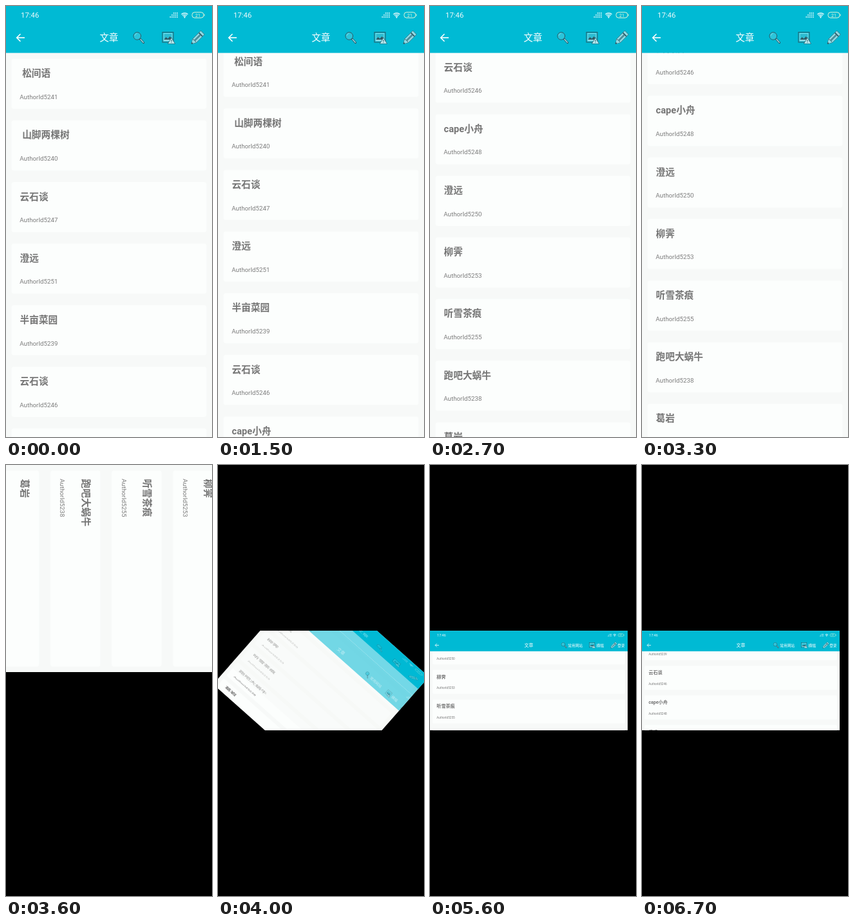
Write an HTML page with a canvas that moves like this. It is 320 by 666 pixels and loops after 6800 ms.

```html
<!DOCTYPE html>
<html lang="zh-CN">
<head>
<meta charset="utf-8">
<title>文章</title>
<style>
html, body { margin: 0; width: 100%; height: 100%; overflow: hidden; background: #000; }
canvas { display: block; width: 320px; height: 666px; }
</style>
</head>
<body>
<canvas id="stage"></canvas>
<script>
const W = 320, H = 666, LOOP = 6800, STEP = 100;
const K = W / H;              // size of the landscape screen on the stage
const BAND = W * K;           // height of the landscape screen on the stage
const LAND_W = 639;
const PITCH = 95.2;
const CYAN = '#00bad4', PAGE = '#f7f9f8', CARD = '#fcfefd';
const INK = '#2f5a66', PALE = '#8fdbe5';
const FONT = 'Roboto, "Noto Sans CJK SC", "Noto Sans CJK", sans-serif';

const items = [
  [' 松间语', 5241], [' 山脚两棵树', 5240], ['云石谈', 5247], ['澄远', 5251],
  ['半亩菜园', 5239], ['云石谈', 5246], ['cape小舟', 5248], ['澄远', 5250],
  ['柳霁', 5253], ['听雪茶痕', 5255], ['跑吧大蜗牛', 5238], ['葛岩', 5252]
];

const canvas = document.getElementById('stage');
const g = canvas.getContext('2d');
const dpr = Math.max(1, window.devicePixelRatio || 1);
canvas.width = W * dpr;
canvas.height = H * dpr;

const mix = (a, b, p) => a + (b - a) * p;
const part = (t, a, b) => Math.min(1, Math.max(0, (t - a) / (b - a)));
const smooth = p => p * p * (3 - 2 * p);
const easeOut = p => 1 - (1 - p) * (1 - p);

function rect(x, y, w, h, color) {
  g.fillStyle = color;
  g.fillRect(x, y, w, h);
}

function pill(x, y, w, h, r) {
  g.beginPath();
  g.roundRect(x, y, w, h, r);
}

function text(str, x, y, size, color, weight = 400, align = 'left') {
  g.font = `${weight} ${size}px ${FONT}`;
  g.textAlign = align;
  g.fillStyle = color;
  g.fillText(str, x, y);
}

function line(points, color, width, close) {
  g.beginPath();
  points.forEach(([x, y]) => g.lineTo(x, y));
  if (close) g.closePath();
  g.strokeStyle = color;
  g.lineWidth = width;
  g.stroke();
}

function at(x, y, draw) {
  g.save();
  g.translate(x, y);
  draw();
  g.restore();
}

function list(top, width, height, scroll) {
  g.save();
  g.beginPath();
  g.rect(0, top, width, height - top);
  g.clip();
  items.forEach(([title, id], i) => {
    const y = top + 9 + i * PITCH - scroll;
    if (y > height || y < top - 80) return;
    pill(8.5, y, width - 17, 77.5, 4);
    g.fillStyle = CARD;
    g.fill();
    text(title, 21.5, y + 27.6, 14.7, '#757575', 700);
    text('AuthorId' + id, 21.3, y + 62.2, 9.75, '#7c7c7c');
  });
  g.restore();
}

function signal() {
  for (let c = 0; c < 5; c++) {
    for (let r = 0; r < 3; r++) {
      if (r + c > 1) rect(-6.5 + c * 2.7, -4 + r * 3, 1.6, 2, 'rgba(255,255,255,.75)');
    }
  }
}

function wifi() {
  g.strokeStyle = '#fff';
  g.lineWidth = 1.2;
  for (const r of [2.8, 5, 7.2]) {
    g.beginPath();
    g.arc(0, 4, r, -Math.PI * 0.75, -Math.PI * 0.25);
    g.stroke();
  }
  g.beginPath();
  g.arc(0, 3.6, 1.1, 0, 7);
  g.fillStyle = '#fff';
  g.fill();
}

function battery() {
  pill(-9, -4.3, 18, 8.6, 4);
  g.strokeStyle = '#e4f6d8';
  g.lineWidth = 1;
  g.stroke();
  rect(9.6, -1.5, 1, 3, '#e4f6d8');
  text('21', 0, 2.5, 7, '#e9f7e0', 400, 'center');
}

function arrow() {
  line([[6.5, 0], [-5.5, 0]], '#fff', 1.6);
  line([[0, -5.8], [-5.8, 0], [0, 5.8]], '#fff', 1.6);
}

function magnifier() {
  g.lineCap = 'round';
  line([[2, 1.5], [7.5, 7.5]], INK, 3.2);
  line([[3, 2.5], [7.3, 7.3]], PALE, 1.5);
  g.beginPath();
  g.arc(-2.2, -2.6, 5.8, 0, 7);
  g.fillStyle = '#2bc5da';
  g.fill();
  g.strokeStyle = INK;
  g.lineWidth = 1;
  g.stroke();
  g.beginPath();
  g.arc(-2.2, -2.6, 4, 3.3, 4.6);
  g.strokeStyle = PALE;
  g.lineWidth = 0.8;
  g.stroke();
}

function picture() {
  g.strokeStyle = INK;
  g.lineWidth = 1;
  g.strokeRect(-8.5, -8.5, 17, 15.5);
  rect(-7, -7, 14, 12.5, PALE);
  rect(-6, -6, 12, 9, '#2bbdd2');
  g.beginPath();
  [[-6, 3], [-3, -1], [0, 1.5], [3, -2], [6, 1], [6, 3]].forEach(([x, y]) => g.lineTo(x, y));
  g.fillStyle = INK;
  g.fill();
  const sign = [[5.5, 0.5], [10.5, 9], [0.5, 9]];
  line(sign, INK, 1.2, true);
  g.fillStyle = '#b5e8ee';
  g.fill();
  rect(5, 3.2, 1, 2.8, INK);
  rect(5, 7, 1, 1, INK);
}

function pencil() {
  g.rotate(-Math.PI / 4);
  g.lineJoin = 'round';
  line([[-13, 0], [-7, -3.8], [11, -3.8], [11, 3.8], [-7, 3.8]], INK, 1, true);
  g.fillStyle = PALE;
  g.fill();
  rect(-6, -1.3, 12, 2.6, '#4e8b98');
  line([[-7, -3.8], [-6, 0], [-7, 3.8]], INK, 0.8);
  rect(6, -3.8, 1.8, 7.6, INK);
  line([[-13, 0], [-11, 0]], INK, 2);
}

// bar: positions of the header parts
const tall = { w: W, h: H, top: 72.5, row: 49, status: [261, 277.5, 298], icons: [206, 251.5, 297.5], labels: [] };
const wide = {
  w: LAND_W, h: W, top: 66, row: 46.6, status: [581, 597, 617], icons: [433, 524, 594],
  labels: [['常用网站', 446], ['横幅', 538], ['登录', 606]]
};

function screen(bar, scroll, clockX, empty) {
  rect(0, 0, bar.w, bar.h, PAGE);
  if (!empty) list(bar.top, bar.w, bar.h, scroll);
  rect(0, 0, bar.w, bar.top, CYAN);
  text('17:46', clockX, 18.4, 11.4, '#eefafb');
  [signal, wifi, battery].forEach((draw, i) => at(bar.status[i], 14, draw));
  at(22.5, bar.row, arrow);
  text('文章', bar.w / 2, bar.row + 5.4, 14.4, '#fff', 400, 'center');
  [magnifier, picture, pencil].forEach((draw, i) => at(bar.icons[i], bar.row, draw));
  bar.labels.forEach(([name, x]) => text(name, x, bar.row + 4.4, 11.8, '#fff'));
}

function tallScroll(t) {
  if (t < 2100) return 241 * part(t, 1450, 2100);
  if (t < 2700) return mix(241, 485.5, part(t, 2100, 2700));
  return mix(485.5, 514, easeOut(part(t, 2700, 2950)));
}

function wideScroll(t) {
  if (t <= 5600) return mix(514, 711, smooth(part(t, 4920, 5600)));
  return mix(711, 438, easeOut(part(t, 5620, 6750)));
}

function bandTop() {
  g.translate(0, (H - BAND) / 2);
  g.scale(K, K);
}

function turning(t) {
  const p = smooth(part(t, 3700, 4270));
  g.beginPath();
  g.rect(0, (H - BAND) / 2, W, BAND);
  g.clip();
  g.translate(W / 2, H / 2);
  g.rotate((1 - p) * Math.PI / 2);

  const sx = mix(K, 1, p), sy = mix(K, BAND / H, p);
  g.save();
  g.scale(sx, sy);
  g.translate(-W / 2, -H / 2);
  screen(tall, 514, 24);
  g.restore();

  // the new screen fades in inside the old one
  g.beginPath();
  g.rect(-W / 2 * sx, -H / 2 * sy, W * sx, H * sy);
  g.clip();
  g.globalAlpha = p;
  g.translate(-W / 2, -BAND / 2);
  g.scale(K, K);
  rect(0, -200, H, 200, CYAN);
  screen(wide, 514, 23, true);
}

function draw(t) {
  g.setTransform(dpr, 0, 0, dpr, 0, 0);
  rect(0, 0, W, H, '#000');
  g.save();
  if (t < 3500) {
    screen(tall, tallScroll(t), t < 1500 ? 23 : 24);
  } else if (t < 3700) {
    g.translate(H, 0);
    g.rotate(Math.PI / 2);
    screen(tall, 514, 24);
  } else if (t < 4300) {
    turning(t);
  } else {
    bandTop();
    screen(wide, wideScroll(t), 23);
  }
  g.restore();
}

const start = performance.now();
function tick() {
  const t = (performance.now() - start) % LOOP;
  draw(Math.floor(t / STEP) * STEP);
  requestAnimationFrame(tick);
}
tick();
</script>
</body>
</html>
```
